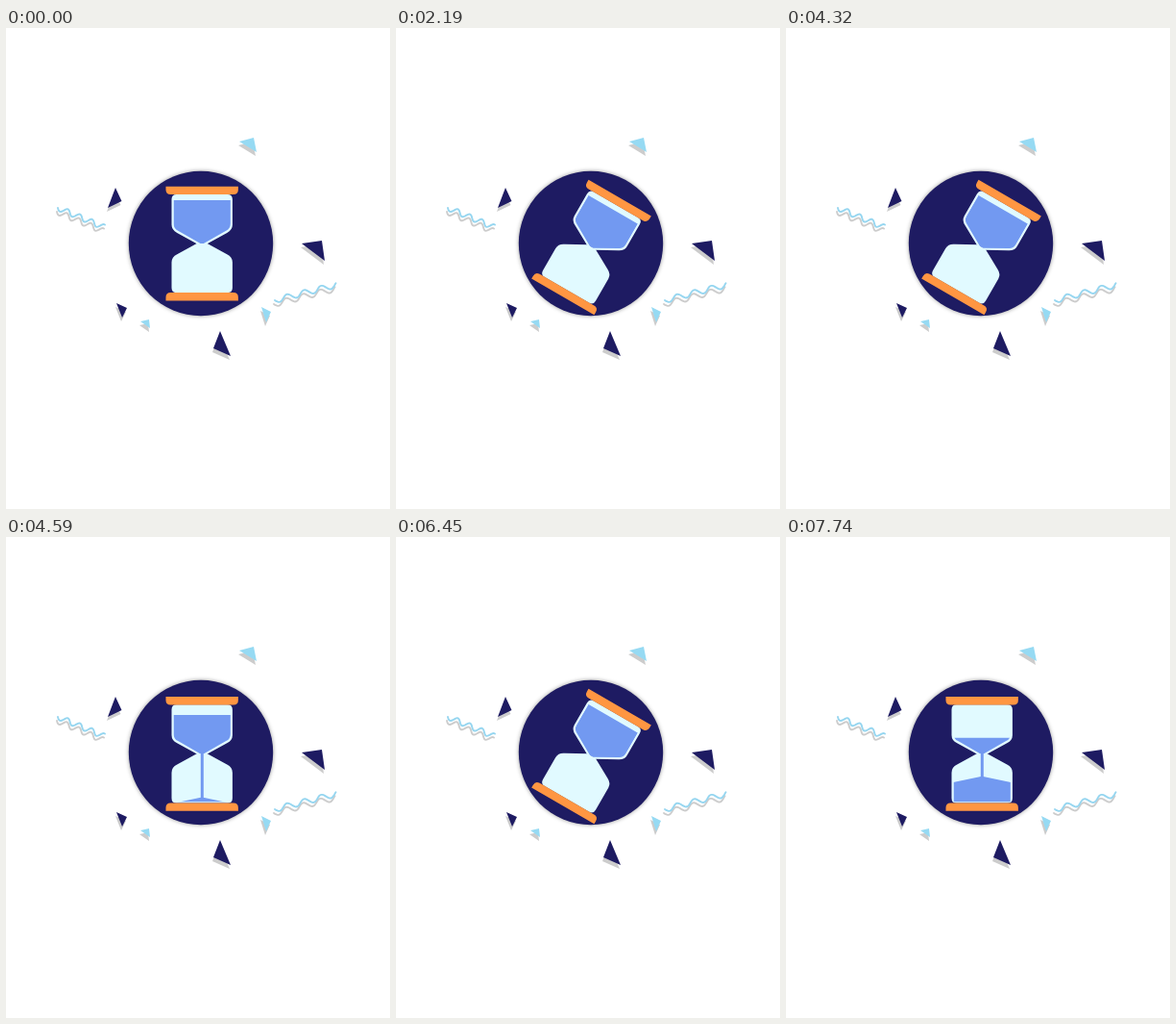
An HTML page that plays this animation: 400x500 px, repeating every 8 s.

```html
<!DOCTYPE html>
<html lang="en">
<head>
<meta charset="utf-8">
<title>Hourglass</title>
<style>
  html, body { margin: 0; width: 100%; height: 100%; overflow: hidden; background: #fff; }
  svg { display: block; width: 400px; height: 500px; }
  .disc { filter: drop-shadow(0 0 2px rgba(0, 0, 0, .4)); }
  #confetti { filter: drop-shadow(-1px 4px .5px rgba(0, 0, 0, .2)); }
  .navy { fill: #1e1b62; }
  .sky { fill: #96daf3; }
  .wave { fill: none; stroke: #96d6f0; stroke-width: 1.9; stroke-linecap: round; }
  .cap { fill: #ff9642; }
  .bulb { fill: #e1faff; }
  .sand { fill: #7299f1; }
</style>
</head>
<body>
<svg viewBox="0 0 400 500">
  <defs>
    <clipPath id="discClip"><circle cx="203" cy="224" r="75.2"/></clipPath>
    <clipPath id="inner"><path d="M-29.6-50H29.6V-20.5Q29.6-15.5 25-13.3L1.5 0H-1.5L-25-13.3Q-29.6-15.5-29.6-20.5Z"/></clipPath>
    <g id="half">
      <path class="bulb" d="M-31.7-46Q-31.7-51.2-26.5-51.2H26.5Q31.7-51.2 31.7-46V-19.5Q31.7-14 26-11.2L5 .3H-5L-26-11.2Q-31.7-14-31.7-19.5Z"/>
      <path class="cap" d="M-37.7-59.4H37.7V-56Q37.7-51 32.7-51H-32.7Q-37.7-51-37.7-56Z"/>
    </g>
  </defs>

  <g id="confetti">
    <path class="sky" d="M243 118L258 114L261 129ZM140 305L149 303L150 312ZM266 290L276 295L271 306Z"/>
    <path class="navy" d="M114 166L120.5 180L106 187ZM308 224L329 221L332 242ZM115 286L126 291L121 301ZM223 315L234 341L216 333Z"/>
  </g>

  <circle class="navy disc" cx="203" cy="224" r="75.2"/>
  <g clip-path="url(#discClip)">
    <g id="glass">
      <use href="#half"/>
      <use href="#half" transform="scale(1 -1)"/>
      <g clip-path="url(#inner)"><path id="upper" class="sand"/></g>
      <g transform="scale(1 -1)"><g clip-path="url(#inner)"><path id="lower" class="sand" transform="scale(1 -1)"/></g></g>
      <path id="stream" class="sand"/>
    </g>
  </g>
</svg>
<script>
const $ = id => document.getElementById(id);
const draw = (id, d) => $(id).setAttribute('d', d);

const LOOP = 8000, FIRST_TURN = 1950, CYCLE = 2130, STEP = 30;
const FIRST_DRAIN = [270, 540, 810, 1080, 1350, 1650];
const DRAIN = [510, 720, 990, 1260, 1530, 1830];
const TOP = [-45.2, -40.4, -35.6, -30.2, -22.7, -16.6];
const HEAP = [0, 51.4, 46.6, 40.6, 35.6, 29.6];
const SWING = 30, PEAK = 8, REST = 14;

// Wavy ribbon between two points.
function wave(x0, y0, x1, y1, turns, amp) {
  const dx = x1 - x0, dy = y1 - y0, len = Math.hypot(dx, dy);
  let d = '';
  for (let i = 0; i <= 60; i++) {
    const u = i / 60, s = amp * Math.sin(u * turns * 2 * Math.PI);
    d += `${i ? 'L' : 'M'}${x0 + dx * u - dy / len * s} ${y0 + dy * u + dx / len * s}`;
  }
  const path = document.createElementNS('http://www.w3.org/2000/svg', 'path');
  path.setAttribute('class', 'wave');
  path.setAttribute('d', d);
  $('confetti').append(path);
}
wave(54, 187, 102, 207, 3.8, 2.8);
wave(280, 283, 344, 267, 3.6, 3);

const ease = u => (1 - Math.cos(Math.PI * Math.min(1, u))) / 2;

// Half a turn clockwise, past upright, then back.
function turnAngle(ms) {
  const i = Math.floor(ms / STEP);
  return i <= PEAK
    ? -180 + (180 + SWING) * ease((i + 1) / (PEAK + 1))
    : SWING * (1 - ease((i - PEAK) / (REST - PEAK)));
}

function render(t) {
  const first = t < FIRST_TURN;
  const ms = first ? t : (t - FIRST_TURN) % CYCLE;
  const level = (first ? FIRST_DRAIN : DRAIN).filter(at => ms >= at).length;
  const empty = level === 6, flowing = level > 0 && !empty;

  let turn = '';
  if (empty) turn = 'rotate(180)';
  else if (!first && !level) turn = `rotate(${turnAngle(ms)} -5.2 0)`;
  $('glass').setAttribute('transform', `translate(204.2 ${first ? 224.1 : 225.4}) ${turn}`);

  const edge = HEAP[level];
  draw('upper', `M-30 ${TOP[empty ? 0 : level]}H30V0H-30Z`);
  draw('lower', flowing ? `M-30 ${edge}L0 ${edge - 6.3}L30 ${edge}V52H-30Z` : '');
  draw('stream', flowing ? `M-1.4-3H1.6V${edge - 5}H-1.4Z` : '');
}

const start = performance.now();
function tick() {
  render((performance.now() - start) % LOOP);
  requestAnimationFrame(tick);
}
tick();
</script>
</body>
</html>
```
